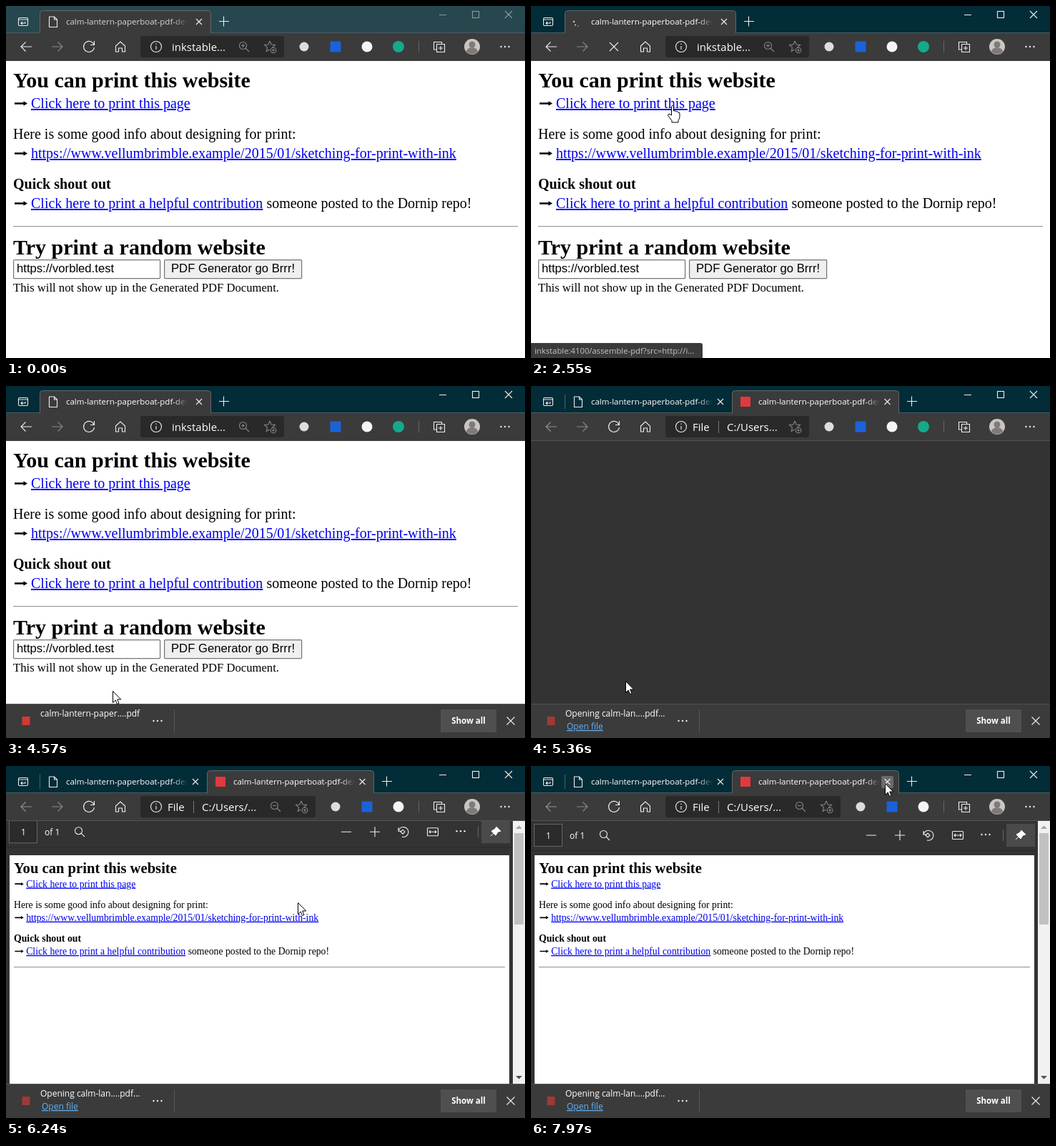
These frames come from a looping animation (726 px wide and 493 px high, 8000 ms). An HTML page:

```html
<!DOCTYPE html>
<html lang="en">
<head>
<meta charset="utf-8">
<title>Print demo</title>
<style>
  html, body { margin: 0; width: 100%; height: 100%; overflow: hidden; background: #fff; }
  svg { display: block; width: 726px; height: 493px; }
  text { font-family: "Open Sans", "Noto Sans", sans-serif; fill: #fff; }
  .serif text { font-family: "Liberation Serif", serif; fill: #000; }
  .serif .link { fill: #00e; text-decoration: underline; }
  .form text { font-family: "Liberation Sans", sans-serif; font-size: 16.667px; fill: #000; }
  .form rect { stroke: #767676; stroke-width: 1.25; }
  .line { fill: none; stroke: #eee; stroke-width: 1.1; }
  .dim { stroke: #888; }
  .tab { fill: #3b3b3b; stroke: #62676a; }
  .title { font-size: 11.5px; fill: url(#fade); }
  .address { font-size: 15px; }
  .small { font-size: 12px; }
</style>
</head>
<body>
<svg viewBox="0 0 726 493">
  <defs>
    <linearGradient id="fade" gradientUnits="userSpaceOnUse" x1="150" x2="170" y1="0" y2="0">
      <stop stop-color="#fff"/><stop offset="1" stop-color="#fff" stop-opacity="0"/>
    </linearGradient>
    <clipPath id="tabClip"><rect id="tabMask" x="281" y="0" height="38"/></clipPath>
    <clipPath id="itemClip"><rect id="itemMask" y="440" height="53"/></clipPath>
    <clipPath id="toolClip"><rect y="77" width="709" height="48"/></clipPath>
    <path id="cross" d="M-4-4 4 4M4-4-4 4"/>
    <g id="dots" fill="#eee"><circle cx="-5.5" r="1.2"/><circle r="1.2"/><circle cx="5.5" r="1.2"/></g>
    <path id="arrow" d="M0-1.200H12.500V-3.300L18 0 12.500 3.300V1.200H0Z"/>
  </defs>

  <rect width="726" height="493" fill="#fff"/>
  <g id="webPage">
    <g id="webText" class="serif"></g>
    <g class="serif">
      <text x="10" y="348" font-size="30" font-weight="bold">Try print a random website</text>
      <text x="10" y="400" font-size="16.667">This will not show up in the Generated PDF Document.</text>
    </g>
    <g class="form">
      <rect x="10.600" y="355.600" width="205" height="26" rx="1" fill="#fff"/>
      <text x="15" y="373">https://vorbled.test</text>
      <rect x="221.600" y="355.600" width="192" height="26" rx="1" fill="#efefef"/>
      <text x="231" y="373">PDF Generator go Brrr!</text>
    </g>
  </g>

  <rect id="dark" y="77" width="726" height="416" fill="#333"/>
  <g id="pdfView">
    <rect x="5" y="125" width="699" height="320" fill="#fff"/>
    <g id="pdfText" class="serif"></g>
    <rect x="709" y="77" width="17" height="368" fill="#f1f1f1"/>
    <rect x="711" y="94" width="13" height="128" fill="#c1c1c1"/>
    <path d="M713 88l4.5-4.5 4.5 4.5z" fill="#a3a3a3"/>
    <path d="M713 434l4.5 4.5 4.5-4.5z" fill="#505050"/>
    <g clip-path="url(#toolClip)"><g id="tools">
      <rect y="77" width="709" height="42" fill="#333"/>
      <path d="M0 118.5H709" stroke="#292929"/>
      <rect x="4.500" y="81.500" width="39" height="31" fill="#2b2b2b" stroke="#666"/>
      <text class="small" x="21" y="102">1</text>
      <text class="small" x="54" y="102">of 1</text>
      <path class="line" d="M105 99l5 5M469 97H483M509 97H523M516 90V104M549 96a7 7 0 1 1 5 8M549 91v5h5M558 97l-3 3-3-3 3-3z"/>
      <circle class="line" cx="101.500" cy="95.500" r="5"/>
      <rect class="line" x="589.500" y="91.500" width="15" height="11" rx="1"/>
      <path class="line" d="M592 97H602M594 95l-2 2 2 2M600 95l2 2-2 2"/>
      <use href="#dots" x="636" y="96"/>
      <path d="M660.500 89V105" stroke="#666"/>
      <rect x="665" y="81" width="40" height="32" fill="#4a4a4a"/>
      <path d="M686 90l6 6-4 1-3 5-6-6 5-3zM682 99l-4 4" fill="#fff" stroke="#fff"/>
    </g></g>
  </g>

  <rect id="titleBar" width="726" height="38"/>
  <path d="M0 37.500H726" stroke="#4f5c60"/>
  <rect class="line" x="17.500" y="16.500" width="13" height="11" rx="1.500"/>
  <path class="line" d="M17 19H30M27 22v2H21M23 22l-2 2 2 2"/>
  <path id="tabLine" d="M47.500 12V32" stroke="#4a646b"/>
  <rect id="firstTab" class="tab" x="47.500" y="6.500" width="239" height="36" rx="4"/>
  <path id="file" class="line" d="M60.500 15H67.500L71.500 19V29.500H60.500ZM67.500 15V19H71.500"/>
  <g id="spinner" fill="#ccc"><circle cx="-6" r="1.300"/><circle cx="-3.900" cy="4.500" r="1.100"/><circle cy="6" r=".7"/></g>
  <text id="firstTitle" class="title" transform="translate(84 26)">calm-lantern-paperboat-pdf-demo</text>
  <use id="firstClose" href="#cross" class="line" y="22"/>
  <g clip-path="url(#tabClip)">
    <rect class="tab" x="281.500" y="6.500" width="233" height="36" rx="4"/>
    <rect x="293" y="15" width="14" height="14" rx="1" fill="#e0393e"/>
    <text class="title" transform="translate(318 26)">calm-lantern-paperboat-pdf-demo</text>
    <rect id="closeHover" x="490" y="14" width="17" height="17" rx="2" fill="#6a6a6a"/>
    <use href="#cross" class="line" x="498.500" y="22"/>
  </g>
  <path id="plus" class="line" d="M298 21.500H312M304.500 14.500V28.500"/>
  <g id="controls" class="line">
    <path d="M606 12.500H616M698 7l10 10M708 7l-10 10"/><rect x="652.500" y="7.500" width="9" height="9"/>
  </g>

  <rect y="38" width="726" height="39" fill="#3b3b3b"/>
  <path id="toolLine" d="M0 76.500H726" stroke="#525252"/>
  <path id="back" class="line" d="M36 57H21M27.500 50.500 21 57l6.500 6.500"/>
  <path class="line dim" d="M64 57H79M72.500 50.500 79 57l-6.500 6.500"/>
  <path id="reload" class="line" d="M123 54A7.500 7.500 0 1 0 123.500 58M123.500 49V54.500H118"/>
  <path id="stop" class="line" d="M110 51l12 12M122 51l-12 12"/>
  <path class="line" d="M153.500 56 160 50l6.500 6V64H162.500V59H157.500V64H153.500Z"/>
  <rect id="addressBox" x="188" y="42" height="30" rx="3" fill="#292929"/>
  <circle class="line" cx="210" cy="57" r="7.500"/>
  <path class="line" d="M210 56V61M210 52.500V54"/>
  <g id="webAddress">
    <text class="address" x="232" y="63">inkstable...</text>
    <g class="line dim"><circle cx="331.500" cy="55.500" r="5"/><path d="M335 59l5 5M329 55.500h5M331.500 53v5"/></g>
  </g>
  <g id="fileAddress">
    <text class="address" x="226" y="63">File</text>
    <path d="M262.500 49V66" stroke="#777"/>
    <text id="path" class="address" x="274" y="63"></text>
  </g>
  <g id="zoomOut" class="line dim"><circle cx="375.500" cy="55.500" r="5"/><path d="M379 59l5 5M373 55.500h5"/></g>
  <g id="star" class="line dim">
    <path d="M369 49l2.200 5 5.300.5-4 3.600M369 49l-2.200 5-5.300.5 4 3.600-1.200 5.400 4.200-2.500"/>
    <circle cx="374" cy="62" r="3.800"/><path d="M372 62h4M374 60v4"/>
  </g>
  <g id="extensions">
    <circle cx="417" cy="57" r="6.500" fill="#ddd"/>
    <rect x="453.500" y="49.500" width="15" height="15" rx="1" fill="#1b62d8"/>
    <circle cx="505" cy="57" r="7.500" fill="#f5f5f5"/>
    <circle id="greenDot" cx="549" cy="57" r="8" fill="#15a98a"/>
  </g>
  <path d="M577.500 49V65" stroke="#666"/>
  <path class="line" d="M602 61H598.500V50.500H609.500V53M602.500 53.500H613.500V64.500H602.500ZM608 56v6M605 59h6"/>
  <circle cx="652" cy="57" r="11" fill="#c9c6c3"/>
  <circle cx="652" cy="54" r="4.500" fill="#807b78"/>
  <path d="M644 64a8 6 0 0 1 16 0 11 11 0 0 1-16 0" fill="#807b78"/>
  <use href="#dots" x="698" y="57"/>

  <g id="status">
    <path d="M0 472H237Q240 472 240 475V493H0Z" fill="#3b3b3b"/>
    <text x="5" y="487" font-size="11.300" style="fill:#c4c4c4">inkstable:4100/assemble-pdf?src=http://i...</text>
  </g>
  <g id="shelf">
    <rect y="445" width="726" height="48" fill="#3b3b3b"/>
    <path d="M0 445.500H726" stroke="#525252"/>
    <g clip-path="url(#itemClip)">
      <rect id="fileIcon" x="22.500" y="463" width="11" height="12" fill="#d33a32"/>
      <text id="fileName" class="small" x="48" y="463"></text>
      <text id="scanning" x="48" y="485" font-size="11.500" style="fill:#aaa">Scanning...</text>
      <text id="openFile" class="small" x="50" y="481" style="fill:#63b1f3;text-decoration:underline">Open file</text>
    </g>
    <g id="itemEnd"><use href="#dots" x="212" y="469"/><path d="M235.500 453V485" stroke="#575757"/></g>
    <rect x="608" y="453" width="78" height="32" fill="#4f4f4f"/>
    <text x="647" y="473" font-size="11.500" text-anchor="middle" font-weight="bold">Show all</text>
    <path class="line" d="M700.500 463.500l11 11M711.500 463.500l-11 11"/>
  </g>
  <path id="download" d="M36 373V434M14 409l22 26 22-26M10 440H62" fill="none" stroke="#4687ee" stroke-width="4.500"/>

  <g id="cursor" stroke="#000" fill="#fff" stroke-linejoin="round">
    <path id="pointer" d="M.5.500V16.500L4.200 13 6.500 18.500 9 17.500 6.700 12H11.700Z"/>
    <path id="hand" d="M-1.500 14V1.500Q0-.8 1.500 1.500V8Q4 6.500 4.500 9 7 7.500 7.500 10 10 9 10 12V16Q10 19 8 21V24H-1V21.500L-6.500 14.500Q-6.500 11.500-4 12.500Z"/>
  </g>
</svg>
<script>
const LOOP = 8000;
const $ = id => document.getElementById(id);
const show = (id, on) => $(id).setAttribute("visibility", on ? "visible" : "hidden");
const move = (id, x, y = 0) => $(id).setAttribute("transform", `translate(${x} ${y})`);
const opacity = (id, value) => $(id).setAttribute("opacity", value);
const ramp = (t, from, to) => Math.min(1, Math.max(0, (t - from) / (to - from)));
const ease = (t, from, to) => { const u = ramp(t, from, to); return u * u * (3 - 2 * u); };

// The same text appears on the website and, smaller, in the printed document.
function pageText(id, left, top, scaleX, scaleY, right) {
  const x = px => left + px * scaleX, y = px => top + px * scaleY;
  const size = 20 * scaleX;
  const text = (px, py, body, extra = "") =>
    `<text x="${x(px)}" y="${y(py)}" font-size="${size}" ${extra}>${body}</text>`;
  const link = (py, label, rest = "") =>
    `<use href="#arrow" transform="translate(${x(2)} ${y(py - 6.500)}) scale(${scaleX})"/>` +
    text(25, py, `<tspan class="link">${label}</tspan>${rest}`);
  const rule = Math.round(y(194)) + .5;
  $(id).innerHTML =
    `<text x="${left}" y="${top}" font-size="${size * 1.5}" font-weight="bold">You can print this website</text>` +
    link(29, "Click here to print this page") +
    text(0, 72, "Here is some good info about designing for print:") +
    link(99, "https://www.vellumbrimble.example/2015/01/sketching-for-print-with-ink") +
    text(0, 142, "Quick shout out", 'font-weight="bold"') +
    link(169, "Click here to print a helpful contribution", " someone posted to the Dornip repo!") +
    `<path d="M${left} ${rule}H${right}" stroke="#999"/><path d="M${left} ${rule + 1}H${right}" stroke="#eee"/>`;
}
pageText("webText", 10, 114, 1, 1, 716);
pageText("pdfText", 11, 150, .6875, .674, 698);

// Pointer moves: start time, end time, target x, target y.
const moves = [
  [0, 0, 500, 471], [370, 1120, 300, 229], [1220, 2010, 198, 144], [2040, 2400, 198, 139],
  [2850, 3620, 330, 150], [3880, 4440, 149, 427], [4590, 4880, 86, 470],
  [5000, 5340, 132, 413], [5500, 6220, 408, 191], [6880, 7630, 485, 58], [7730, 7960, 495, 24]
];
function pointerAt(t) {
  let x = 0, y = 0;
  for (const [from, to, tx, ty] of moves) {
    if (t < from) break;
    const k = to ? ease(t, from, to) : 1;
    x += (tx - x) * k;
    y += (ty - y) * k;
  }
  return [x, y];
}

function draw(t) {
  const [x, y] = pointerAt(t);
  const onLink = t > 1220 && t < 3600 && x < 258 && y < 149;
  show("cursor", t >= 370);
  move("cursor", x, y);
  $("pointer").style.display = onLink ? "none" : "";
  $("hand").style.display = onLink ? "" : "none";

  const active = t >= 2300, loading = active && t < 3600;
  $("titleBar").setAttribute("fill", active ? "#022c37" : "#27474f");
  opacity("controls", active ? 1 : .5);
  opacity("firstTitle", active ? 1 : .8);
  show("spinner", loading);
  show("stop", loading);
  show("file", !loading);
  show("reload", !loading);
  $("spinner").setAttribute("transform", `translate(66 22) rotate(${(t - 2550) * .36})`);

  const opened = t >= 5000, printed = t >= 5900;
  const tab = ease(t, 5000, 5180);
  show("webPage", !opened);
  show("dark", opened);
  show("toolLine", opened);
  show("firstTab", !opened);
  show("tabLine", opened);
  $("firstClose").setAttribute("x", opened ? 265 : 270);
  $("tabMask").setAttribute("width", 234 * tab);
  move("plus", 228 * tab);
  show("closeHover", t > 7880);
  opacity("back", opened ? .5 : 1);

  show("webAddress", !opened);
  show("fileAddress", opened);
  $("path").textContent = printed ? "C:/Users/..." : "C:/Users...";
  $("addressBox").setAttribute("width", printed ? 245 : 201);
  show("zoomOut", printed);
  move("star", printed ? 44 : 0);
  move("extensions", printed ? 44 : 0);
  show("greenDot", !printed);

  show("pdfView", printed);
  move("tools", 0, -42 * (1 - ramp(t, 6040, 6430)) ** 3);

  const rise = ease(t, 3650, 3780), item = ease(t, 3690, 4090);
  opacity("status", ramp(t, 2060, 2200) * (1 - ramp(t, 3770, 3970)));
  move("status", 0, -48 * rise);
  move("shelf", 0, 48 * (1 - rise));
  $("itemMask").setAttribute("width", 236 * item);
  move("itemEnd", 236 * (item - 1));
  show("scanning", t < 4480);
  show("openFile", t >= 4600);
  opacity("fileIcon", t < 5360 ? 1 : .65);
  $("fileName").textContent = opened ? "Opening calm-lan....pdf..." : "calm-lantern-paper....pdf";

  const drop = ramp(t, 3660, 4080);
  opacity("download", 1 - Math.abs(2 * drop - 1));
  move("download", 0, -60 * Math.max(0, 1 - 2 * drop));
}

function tick() {
  draw(performance.now() % LOOP);
  requestAnimationFrame(tick);
}
tick();
</script>
</body>
</html>
```
